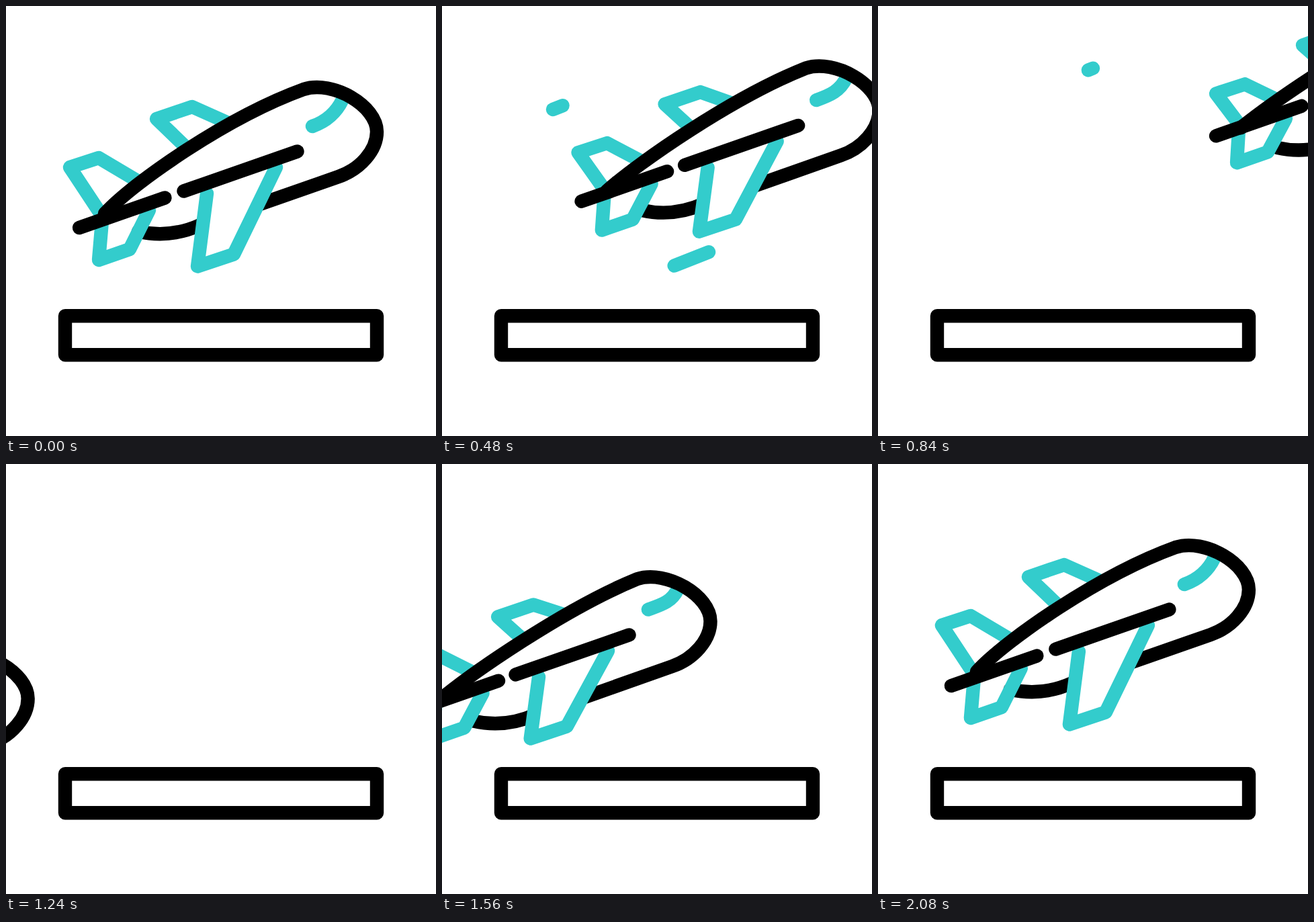
Recreate the animation shown at these times as an HTML page. Size 640 by 640 pixels, loop 2.16 s.

```html
<!DOCTYPE html>
<html lang="en">
<head>
<meta charset="utf-8">
<title>Plane taking off</title>
<style>
  html, body { margin: 0; height: 100%; overflow: hidden; background: #fff; }
  svg { display: block; width: 100%; height: 100%; }
  path, rect, line {
    fill: none; stroke: #000; stroke-width: 20.4;
    stroke-linecap: round; stroke-linejoin: round;
  }
  .teal { stroke: #3cc; }
  .skin { fill: #fff; stroke: none; }
  .wing { fill: #fff; }
</style>
</head>
<body>
<svg viewBox="0 0 640 640">
  <rect x="88" y="461.2" width="464" height="58"/>
  <line class="teal dash"/>
  <line class="teal dash"/>
  <g id="plane"></g>
</svg>
<script>
const LOOP = 2160, STEP = 40, RISE = 0.314;

// How far each kind of point shifts against the belly in full flight
const FOLD = {
  o: [0, 0],       // belly
  t: [-4, -3],     // tail tip
  m: [3, 4],       // back
  n: [-3, 0],      // nose
  u: [11, 15],     // far wing and fin
  c: [1, -11.5],   // cockpit
  l: [-1, -20],    // near fin
  w: [-4, -31.5],  // near wing
  b: [-3, -12],    // rear bar
  f: [-6, -11]     // front bar
};

const hull = 'M147,309t C190,262m 330,165m 443,124n C487,110n 552,149n 552,187n' +
  ' C552,215n 527,243n 495,254n L289,326o';
const belly = ' C262,338o 230,343o 197,335.5o';

const plane = document.getElementById('plane');
const parts = [
  ['teal', 'M275,217m L224,168u L277,150u L333,175m'],
  ['teal', 'M140,308b L95,240u L138,226u L202,264m'],
  ['skin', hull + belly],
  ['teal', 'M456,179c C476,172c 492,158o 501,139o'],
  ['', 'M289,326o' + belly],
  ['teal', 'M143,320b L138,378l L184,362l L213,304b'],
  ['', hull],
  ['teal wing', 'M299,279f L285,387.5w L339,369.5w L402,240f'],
  ['', 'M109,330b L236.5,285.5b'],
  ['', 'M264.5,275.5f L433.5,216.5f']
].map(([name, shape]) => {
  const el = document.createElementNS('http://www.w3.org/2000/svg', 'path');
  el.setAttribute('class', name);
  plane.append(el);
  return { el, shape };
});
const [high, low] = document.querySelectorAll('.dash');

// Smooth 0..1 ramp over a time span
function ramp(t, start, length) {
  const u = Math.min(1, Math.max(0, (t - start) / length));
  return u * u * (3 - 2 * u);
}

// Speeds up out of the stage, then slows down into place
function travel(t) {
  return t < 1100
    ? 100.5 * (Math.max(0, t - 70) / 410) ** 2.18
    : -150 * (Math.max(0, 2120 - t) / 560) ** 2.735;
}

function bend(shape, amount) {
  return shape.replace(/([\d.]+),([\d.]+)([a-z])/g, (_, x, y, kind) => {
    const [dx, dy] = FOLD[kind];
    return `${+x + dx * amount},${+y + dy * amount}`;
  });
}

function drawDash(el, x, y, start, t) {
  const tail = 155 * ramp(t, start + 120, 353);
  const head = 155 * ramp(t, start, 353);
  el.style.display = head > tail ? '' : 'none';
  el.setAttribute('x1', x + tail);
  el.setAttribute('y1', y - tail * 0.396);
  el.setAttribute('x2', x + head);
  el.setAttribute('y2', y - head * 0.396);
}

function draw(now) {
  const t = Math.floor(now % LOOP / STEP) * STEP;
  const d = travel(t);
  const folded = ramp(t, 211, 451) - ramp(t, 1441, 451);
  plane.setAttribute('transform', `translate(${d} ${-d * RISE})`);
  for (const { el, shape } of parts) el.setAttribute('d', bend(shape, folded));
  drawDash(high, 165, 154, 413, t);
  drawDash(low, 344.5, 387, 342, t);
}

const begin = performance.now();
function tick() {
  draw(performance.now() - begin);
  requestAnimationFrame(tick);
}
tick();
</script>
</body>
</html>
```
